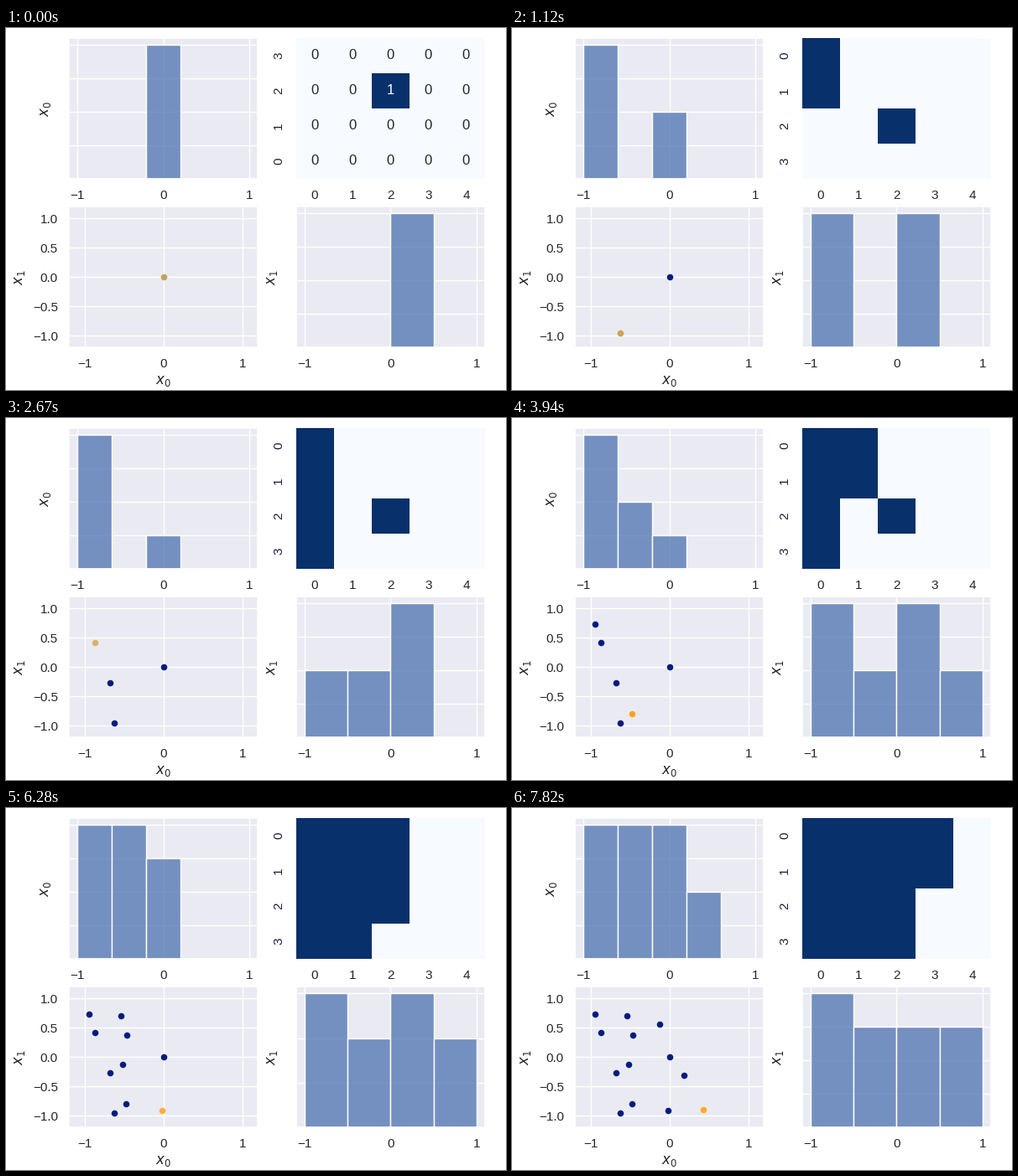
A matplotlib script that plays this animation: 596 by 432 pixels, repeating every 8000 ms.

```python
import matplotlib.pyplot as plt
import numpy as np
from matplotlib.animation import FuncAnimation

W, H, DPI = 596, 432, 100
LOOP, STEP = 8000, 40
INK, NAVY_INK = "0.15", "#18213f"

plt.rcParams.update({
    "font.family": ["Liberation Sans", "DejaVu Sans"],
    "font.size": 12,
    "axes.facecolor": "#eaeaf2", "axes.edgecolor": "white",
    "axes.linewidth": 1.25, "axes.axisbelow": True,
    "grid.color": "white", "grid.linewidth": 1,
    "text.color": INK, "xtick.color": INK, "ytick.color": INK,
    "xtick.labelsize": 11, "ytick.labelsize": 11,
    "xtick.bottom": False, "ytick.left": False,
    "xtick.major.size": 6, "ytick.major.size": 6,
    "xtick.major.pad": 3.5, "ytick.major.pad": 3.5,
})

# Moments (ms) at which the next sample arrives
TIMES = [330, 1120, 1990, 2670, 3270, 3940, 4540, 5140,
         5680, 6280, 6820, 7360, 7820]

# Cells (column, row) in visiting order: the centre, then column by column
HOME = (2, 2)
CELLS = np.array([HOME] + [(c, r) for c in range(5) for r in range(4)
                           if (c, r) != HOME])

POINTS = np.array([
    (0, 0), (-.62, -.96), (-.68, -.27), (-.87, .415), (-.945, .73),
    (-.48, -.8), (-.52, -.13), (-.47, .38), (-.535, .71),
    (-.02, -.91), (.18, -.315), (-.12, .555), (.425, -.89)])
NEWEST = ["#c6a15f", "#d0a252", "#dca855", "#e0b163", "#f0b040", "#fba518",
          "#f6bc60", "#f3d7ae", "#f8bd5c", "#fbb03c", "#fcae34", "#fdae2c",
          "#ffad22"]

fig = plt.figure(figsize=(W / DPI, H / DPI), dpi=DPI, facecolor="white")

# Panel size and the corners of the two-by-two layout, in pixels
AX_W, AX_H = 225.45, 168
LEFT, RIGHT = 75, 345.55
TOP, BOTTOM = 11.6, 213.2


def panel(left, top):
    return fig.add_axes([left / W, 1 - (top + AX_H) / H, AX_W / W, AX_H / H])


def label(x, y, text, rotation=0):
    fig.text(x / W, 1 - y / H, text, rotation=rotation, fontsize=12,
             ha="center", va="center")


def histogram(ax, bins):
    edges = np.linspace(-1, 1, bins + 1)
    ax.grid(True)
    ax.set_xlim(-1.1, 1.1)
    ax.set_xticks([-1, 0, 1])
    ax.tick_params(labelleft=False)
    return ax.bar(edges[:-1], np.zeros(bins), 2 / bins, align="edge",
                  color=(0x4c / 255, 0x72 / 255, 0xb0 / 255, .75),
                  edgecolor="white", linewidth=1)


def set_counts(ax, bars, values):
    counts = np.bincount(values, minlength=len(bars))
    for bar, n in zip(bars, counts):
        bar.set_height(n)
    peak = counts.max()
    tick = {1: .25, 2: .5}.get(peak, 1)
    ax.set_yticks(np.arange(0, peak + tick / 2, tick))
    ax.set_ylim(0, peak * 1.05)


ax_h0, ax_map = panel(LEFT, TOP), panel(RIGHT, TOP)
ax_pts, ax_h1 = panel(LEFT, BOTTOM), panel(RIGHT, BOTTOM)

bars0 = histogram(ax_h0, 5)
bars1 = histogram(ax_h1, 4)

mesh = ax_map.pcolormesh(np.zeros((4, 5)), cmap="Blues", vmin=0, vmax=1)
ax_map.set_xticks(np.arange(5) + .5, range(5))
ax_map.set_yticks(np.arange(4) + .5, range(4), rotation=90, va="center")
for spine in ax_map.spines.values():
    spine.set_visible(False)
notes = [ax_map.text(c + .5, r + .5, str(int((c, r) == HOME)),
                     color="white" if (c, r) == HOME else INK,
                     ha="center", va="center")
         for c in range(5) for r in range(4)]

ax_pts.grid(True)
ax_pts.set(xlim=(-1.2, 1.2), ylim=(-1.2, 1.2), xticks=[-1, 0, 1],
           yticks=np.arange(-1, 1.1, .5))
dot = dict(marker="o", ls="", ms=5.45, mew=0)
past, = ax_pts.plot([], [], color="#001c7f", zorder=3, **dot)
newest, = ax_pts.plot([], [], zorder=4, **dot)

label(47.2, 97, "$x_0$", 90)
label(16.8, 298, "$x_1$", 90)
label(318, 298, "$x_1$", 90)
label(187.3, 421, "$x_0$")


def update(i):
    state = int(np.searchsorted(TIMES, i * STEP + STEP - 1, side="right"))
    # The upper panels run one sample ahead of the lower ones
    ahead, shown = state + 1, max(state, 1)

    grid = np.zeros((4, 5))
    cols, rows = CELLS[:ahead].T
    grid[rows, cols] = 1
    mesh.set_array(grid)
    ax_map.set_ylim((0, 4) if state == 0 else (4, 0))
    for tick in ax_map.get_yticklabels():
        tick.set_color(INK if state == 0 else NAVY_INK)
    for note in notes:
        note.set_visible(state == 0)

    set_counts(ax_h0, bars0, cols)
    set_counts(ax_h1, bars1, CELLS[:shown, 1])

    past.set_data(*POINTS[:shown - 1].T)
    newest.set_data(*POINTS[shown - 1:shown].T)
    newest.set_color(NEWEST[shown - 1])
    return [mesh, past, newest, *bars0, *bars1, *notes]


anim = FuncAnimation(fig, update, frames=LOOP // STEP, interval=STEP,
                     repeat=True, repeat_delay=0, blit=False)
plt.show()
```
